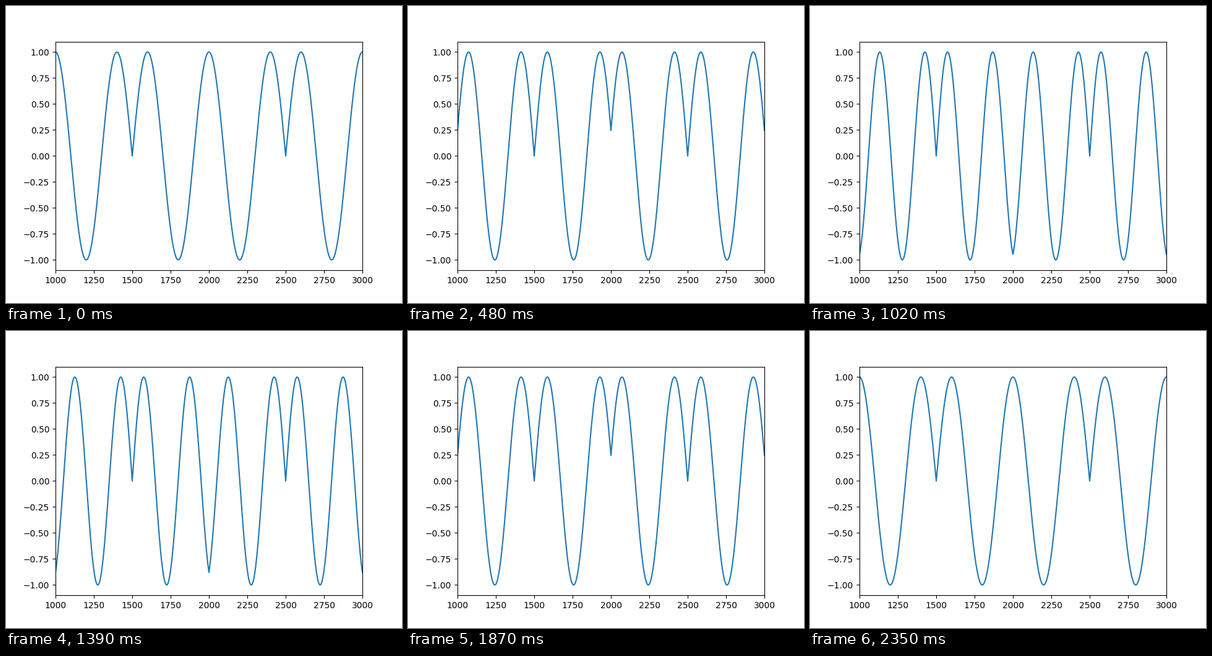
Write a matplotlib script that moves like this. It is 640x480 px and loops after 2410 ms.

```python
import numpy as np
import matplotlib.pyplot as plt
from matplotlib.animation import FuncAnimation

TICK = 10      # ms per drawn frame
LOOP = 2410    # ms per loop
HOLD = 60      # ms each wave shape stays
STEPS = 20     # wave shapes from slowest to fastest

x = np.linspace(1000, 3000, 2001)
# Distance to the nearest mirror point at 1500 or 2500
dist = np.minimum(abs(x - 1500), abs(x - 2500)) / 500
cycles = np.linspace(1.25, 1.75, STEPS)


def wave(step):
    return np.sin(2 * np.pi * cycles[step] * dist)


def step_at(ms):
    """Climb to the fastest wave, rest there, then come back down."""
    return min(ms, LOOP - 1 - ms, (STEPS - 1) * HOLD) // HOLD


fig, ax = plt.subplots(figsize=(6.4, 4.8), dpi=100)
ax.set_xlim(1000, 3000)
ax.set_ylim(-1.1, 1.1)
line, = ax.plot(x, wave(0), color="#1f77b4", linewidth=1.5)


def update(i):
    line.set_ydata(wave(step_at(i * TICK)))
    return line,


anim = FuncAnimation(fig, update, frames=LOOP // TICK, interval=TICK,
                     repeat=True, repeat_delay=0)
plt.show()
```
